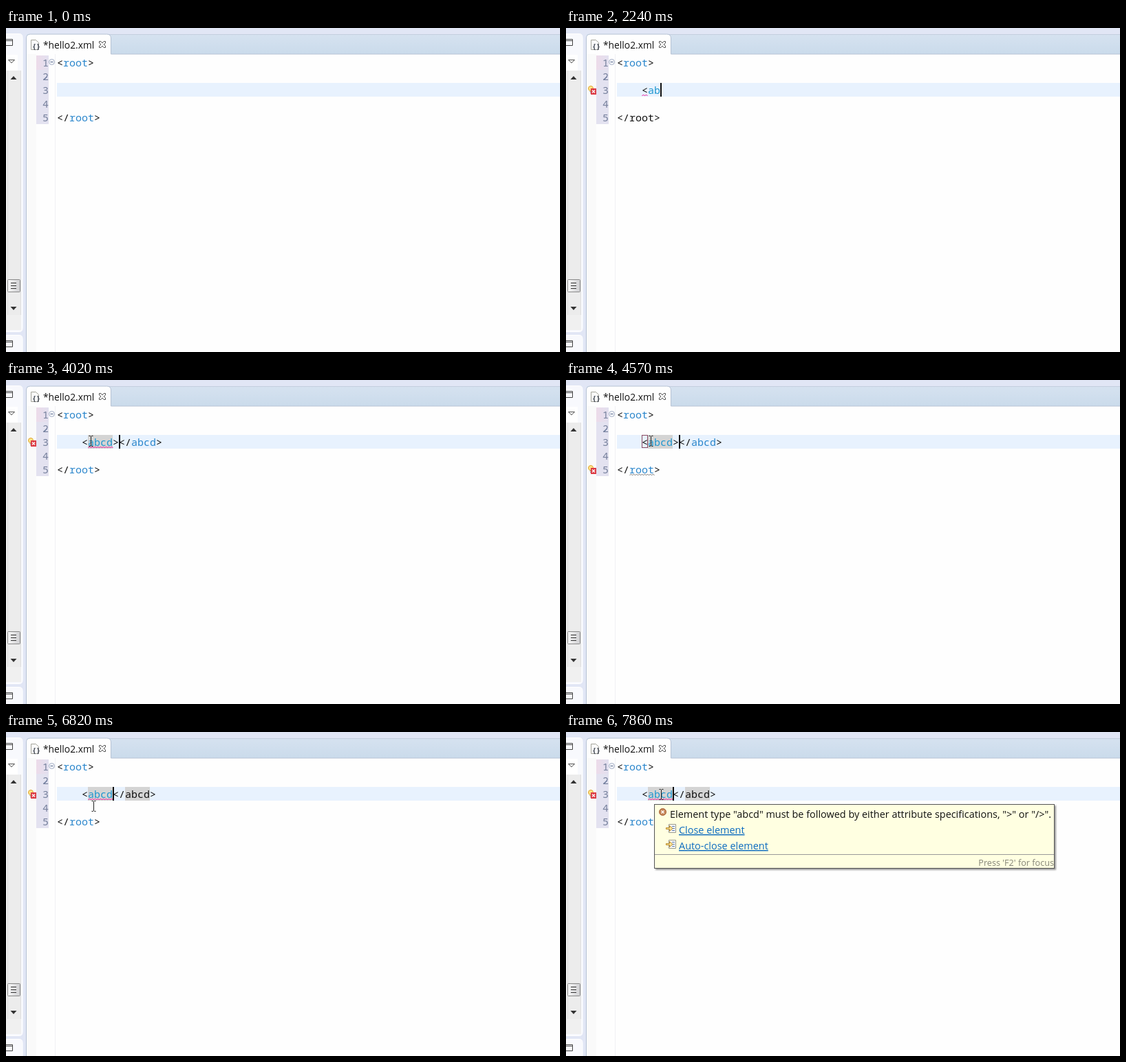
An HTML page for the animation above (8 s loop, 805 px wide and 472 px high).

```html
<!DOCTYPE html>
<html lang="en">
<head>
<meta charset="utf-8">
<title>XML editor</title>
<style>
  html, body { margin: 0; width: 100%; height: 100%; overflow: hidden; background: #fefefe; }
  svg { display: block; width: 805px; height: 472px; }
  text { white-space: pre; }
  .code { font: 15px "Noto Sans Mono", monospace; fill: #111; }
  .code .tag { fill: #2a86cc; }
  .code .open { fill: #1f97d0; }
  .num { font: 15px "Noto Sans Mono", monospace; fill: #76809c; }
  .ui { font: 14.45px "Open Sans", sans-serif; fill: #111; }
  .link { fill: #0a6abf; text-decoration: underline; }
  .line { fill: none; stroke: #555; }
  .mark { fill: #d4d4d4; }
  .wave { fill: none; stroke: #f0189a; }
  .popup { filter: drop-shadow(2px 2px 2px rgba(0, 0, 0, .4)); }
</style>
</head>
<body>
<svg viewBox="0 0 805 472">
  <defs>
    <linearGradient id="bar" x2="0" y2="1">
      <stop stop-color="#d6e2f0"/><stop offset="1" stop-color="#cadbeb"/>
    </linearGradient>
    <linearGradient id="thumb">
      <stop stop-color="#f8f8f8"/><stop offset="1" stop-color="#cfcfd2"/>
    </linearGradient>
    <linearGradient id="ruler">
      <stop stop-color="#eddbe9"/><stop offset="1" stop-color="#e2e0f0"/>
    </linearGradient>
    <g id="problem">
      <circle cx="4" cy="4" r="3.5" fill="#ffe38a" stroke="#dfa62f"/>
      <path d="M2.5 8.5h3M3 10.500h2" stroke="#777"/>
      <rect x="4" y="4" width="8" height="9" fill="#dc3b45"/>
      <path d="M6 6.500l4 4m0-4l-4 4" stroke="#fff" stroke-width="1.300"/>
    </g>
    <g id="fix">
      <path d="M4.500.5h10v12h-10z" fill="#f7f7f2" stroke="#9a9a8c"/>
      <path d="M9 3.500h4M9 6.500h4M9 9.500h4" stroke="#5878b0"/>
      <path d="M.5 5.500h5v-3l4.500 4-4.500 4v-3h-5z" fill="#ffe79a" stroke="#b98a2a"/>
    </g>
  </defs>

  <!-- Side view -->
  <rect width="805" height="472" fill="#e1e6f5"/>
  <path d="M0 8.500h19q5 0 5 5v424q0 5-5 5H0z" fill="#f8f9fd" stroke="#fff"/>
  <path d="M0 447.500h19q5 0 5 5V472H0z" fill="#f8f9fd" stroke="#fff"/>
  <path d="M0 39h17v23H0z" fill="#fff"/>
  <path d="M0 62h22v378H0z" fill="#f0f0f0"/>
  <path d="M2 62h19v356H2z" fill="#ececec"/>
  <path d="M2.500 62v356M21.500 62v356" stroke="#dedede"/>
  <g class="line">
    <path d="M-.5 16.500h10v9h-10zM-.5 18.500h10M-.5 455.500h10v9h-10zM-.5 457.500h10" stroke="#444"/>
    <path d="M3.500 46.500h9l-4.500 4.500z" fill="#fff"/>
    <rect x="2.500" y="366.500" width="18" height="18" rx="1" fill="url(#thumb)" stroke="#8a8a8a"/>
    <path d="M7 371.500h8M7 375.500h8M7 379.500h8" stroke="#333"/>
  </g>
  <path d="M6.500 75l4.500-5 4.500 5zM6.500 406l4.500 5 4.500-5z" fill="#333"/>

  <!-- Editor frame and tab -->
  <path d="M30 9h775v29H30z" fill="url(#bar)"/>
  <path d="M140 9.500h665" stroke="#c3cede"/>
  <path d="M29.500 473V15q0-6 6-6h111q6 0 6 6v23H806v435z" fill="#fefefe" stroke="#b6c2d4"/>
  <path d="M30 38h14v434H30z" fill="#fafafa"/>
  <path d="M71.500 38v434" stroke="#f1f1f3"/>
  <path d="M36.500 17.500h7l4 4v10h-11z" fill="#fafafa" stroke="#a4a49a"/>
  <text x="38" y="31" style="font:bold 10px 'Noto Sans Mono',monospace" fill="#3d4450">{}</text>
  <text class="ui" x="54" y="30" style="font-size:13.800px">*hello2.xml</text>
  <path class="line" d="M135.500 19.500h2.500l2 2.500 2-2.500h2.500v2.500l-2.500 2 2.500 2v2.500h-2.500l-2-2.500-2 2.500h-2.500v-2.500l2.500-2-2.500-2z" stroke="#666"/>

  <!-- Gutter -->
  <path d="M44 40h18v100H44z" fill="#e3e2f0"/>
  <path d="M44 40h18v21H44z" fill="url(#ruler)"/>
  <path d="M74 80h731v20H74z" fill="#e8f2fe"/>
  <g class="num" id="numbers"></g>
  <path d="M56 75l4-4" stroke="#7484a8"/>
  <circle cx="66.500" cy="49.500" r="4" fill="#f4f6fb" stroke="#a3adc4"/>
  <path d="M64.500 49.500h4" stroke="#5d6c8c"/>

  <g id="stage"></g>
  <path id="mouse" d="M.5.5h2l1 1 1-1h2M3.500 1v14M.5 15.500h2l1-1 1 1h2" fill="none" stroke="#222"/>
</svg>

<script>
const LOOP = 8000, CELL = 9, LEFT = 74;
const stage = document.getElementById('stage');
const mouse = document.getElementById('mouse');
const timed = [];

const colX = col => LEFT + col * CELL;
const escapeText = s => s.replace(/&/g, '&amp;').replace(/</g, '&lt;').replace(/>/g, '&gt;');

// Adds markup that is visible inside the given [from, to) pairs.
function add(markup, ...spans) {
  const group = document.createElementNS('http://www.w3.org/2000/svg', 'g');
  group.innerHTML = markup;
  stage.append(group);
  if (spans.length) timed.push({ group, spans });
}

const label = (x, y, text, cls = 'ui', extra = '') =>
  `<text class="${cls}" x="${x}" y="${y}" ${extra}>${escapeText(text)}</text>`;

const code = (row, col, text, cls = '') =>
  `<g class="code">${label(colX(col), 36 + row * 20, text, cls)}</g>`;

const mark = (col, length) =>
  `<rect class="mark" x="${colX(col)}" y="80" width="${length * CELL}" height="20"/>`;

function wave(row, col, length, color = '') {
  const zigzag = 'l2 -2l2 2'.repeat(length * CELL / 4);
  return `<path class="wave" d="M${colX(col) + .5} ${39 + row * 20}${zigzag}" ${color && `stroke="${color}" style="stroke:${color}"`}/>`;
}

const problem = row => `<use href="#problem" x="32" y="${24 + row * 20}"/>`;

const popup = (dx, text, width) => `<g transform="translate(${dx})">
  <rect class="line popup" x="119.500" y="100.500" width="445" height="297" rx="6" style="fill:#fefefe"/>
  <rect class="line" x="126.500" y="107.500" width="431" height="283" stroke-opacity=".85"/>
  <rect x="130.500" y="109.500" width="${width}" height="22" rx="2" fill="#ececec" stroke="#dadada"/>
  <circle cx="138" cy="120" r="5" fill="#8f6a4c"/>
  <text x="135.700" y="123" style="font:bold 8px 'Open Sans',sans-serif" fill="#fff">P</text>
  ${label(149, 126, text)}</g>`;

for (let row = 1; row <= 5; row++)
  document.getElementById('numbers').innerHTML += `<text x="53" y="${36 + row * 20}">${row}</text>`;

// Occurrence highlights and tag match
add(mark(5, 4), [3400, 4810], [6210, LOOP]);
add(mark(11, 4), [6210, LOOP]);
add('<rect class="line" x="110.500" y="80.500" width="8" height="18" style="stroke:#8a4a62"/>', [4190, 5600]);

// Text
add(code(1, 0, '<') + code(1, 1, 'root', 'tag') + code(1, 5, '>'));
add(code(5, 0, '</') + code(5, 6, '>'));
add(code(5, 2, 'root', 'tag'), [0, 1920], [3570, LOOP]);
add(code(5, 2, 'root'), [1920, 3570]);
add(code(3, 4, '<'), [1230, LOOP]);
[1920, 2240, 2620, 2940].forEach((at, i) =>
  add(code(3, 5 + i, 'abcd'[i], 'open'), [at, LOOP]));
add(code(3, 9, '>'), [3570, 5600]);
add(code(3, 10, '</') + code(3, 12, 'abcd', 'tag') + code(3, 16, '>'), [4020, 5600]);
add(code(3, 9, '</abcd>'), [5600, LOOP]);

// Problems
add(problem(3), [1780, 4190], [6120, LOOP]);
add(wave(3, 4, 1), [1780, 3400]);
add(wave(3, 5, 4), [3400, 4190], [6120, LOOP]);
add(problem(5) + wave(5, 2, 4, '#777'), [4190, 4670]);

// Caret: column, from, to
[[4, 760, 1230], [5, 1230, 1780], [6, 1920, 2240], [7, 2240, 2620], [8, 2620, 2940],
 [9, 2940, 3500], [10, 3570, 4100], [10, 4570, 5140], [9, 5600, 6120],
 [9, 6650, 7180], [9, 7710, LOOP]].forEach(([col, from, to]) =>
  add(`<rect x="${colX(col)}" y="80" width="2" height="20" fill="#111"/>`, [from, to]));

add(popup(0, '/root', 58), [1230, 1920]);
add(popup(45, '</abcd>', 79), [3570, 4020]);

add(`<rect class="line" x="128.500" y="105.500" width="581" height="93"
    style="fill:#ffffe1;filter:drop-shadow(2px 2px 1px rgba(0,0,0,.4))"/>
  <circle cx="140.500" cy="116.500" r="5" fill="#c58558" stroke="#a86238"/>
  <path d="M138.500 114.500l4 4m0-4l-4 4" stroke="#fff" stroke-width="1.300"/>
  ${label(151, 125, 'Element type "abcd" must be followed by either attribute specifications, ">" or "/>".')}
  <use href="#fix" x="145" y="134"/><use href="#fix" x="145" y="157"/>
  ${label(164, 148, 'Close element', 'ui link')}
  ${label(164, 171, 'Auto-close element', 'ui link')}
  <path d="M129 178.500h580" stroke="#999"/>
  ${label(709, 195, "Press 'F2' for focus", 'ui', 'text-anchor="end" style="font-size:12.650px;fill:#858578"')}`,
  [7860, LOOP]);

// Pointer stops: time, x, y
const stops = [[70, 506, 389], [150, 185, 134], [380, 165, 115], [450, 140, 97], [530, 120, 81]];

function pointerAt(t) {
  if (t < 70 || (t >= 760 && t < 1230) || (t >= 2240 && t < 3570)) return null;
  if (t < 6600) return stops.filter(s => s[0] <= t).pop().slice(1);
  const p = Math.min(11, Math.floor((t - 6600) / 79) + 1) / 11;
  return [Math.round(120 + 15 * p), Math.round(81 + 2 * p + 24 * Math.sin(Math.PI * p))];
}

function render(now) {
  const t = now % LOOP;
  for (const { group, spans } of timed) {
    const on = spans.some(([from, to]) => t >= from && t < to);
    group.style.display = on ? '' : 'none';
  }
  const pos = pointerAt(t);
  mouse.style.display = pos ? '' : 'none';
  if (pos) mouse.setAttribute('transform', `translate(${pos})`);
}

const start = performance.now();
(function tick() {
  render(performance.now() - start);
  requestAnimationFrame(tick);
})();
</script>
</body>
</html>
```
